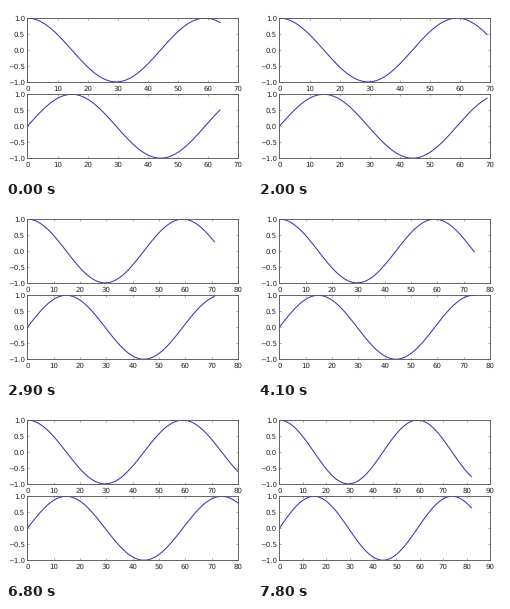
A matplotlib script that plays this animation: 246x173 px, repeating every 8000 ms.

```python
import numpy as np
import matplotlib.pyplot as plt
from matplotlib.animation import FuncAnimation

W, H, DPI = 246, 173, 100
PX = 72 / DPI  # points per pixel
LEFT, RIGHT = 21.4, 232.1
FIRST, PERIOD = 64, 59
INTERVAL, FRAMES = 100, 80
STEPS = [300, 700, 1200, 1600, 2000, 2500, 2900, 3300, 3700,
         4100, 4600, 5000, 5500, 5900, 6300, 6800, 7200, 7800]
GREY, INK, CURVE = "#585858", "#202020", "#4f2cba"

plt.rcParams.update({"font.family": "DejaVu Sans", "font.size": 7.3 * PX,
                     "text.hinting": "none", "text.hinting_factor": 1})
fig = plt.figure(figsize=(W / DPI, H / DPI), dpi=DPI, facecolor="white")


def make_axes(top, bottom):
    ax = fig.add_axes([LEFT / W, 1 - bottom / H,
                       (RIGHT - LEFT) / W, (bottom - top) / H])
    ax.set_ylim(-1, 1)
    ax.set_yticks(np.linspace(-1, 1, 5))
    ax.tick_params(direction="in", top=True, right=True, color=GREY,
                   labelcolor=INK, length=2.4 * PX, width=0.5 * PX)
    ax.tick_params(axis="x", pad=3.6 * PX)
    ax.tick_params(axis="y", pad=2.4 * PX)
    for spine in ax.spines.values():
        spine.set(linewidth=0.9 * PX, edgecolor=GREY)
    line, = ax.plot([], [], color=CURVE, lw=1.05 * PX)
    return ax, line


panels = [(*make_axes(12.1, 75.9), np.cos),
          (*make_axes(88.3, 152.2), np.sin)]


def update(i):
    last = FIRST + int(np.searchsorted(STEPS, i * INTERVAL, side="right"))
    limit = 10 * int(np.ceil(last / 10))
    x = np.arange(last + 1)
    for ax, line, wave in panels:
        line.set_data(x, wave(2 * np.pi * x / PERIOD))
        ax.set_xlim(0, limit)
        ax.set_xticks(range(0, limit + 1, 10))
    return [line for _, line, _ in panels]


anim = FuncAnimation(fig, update, frames=FRAMES, interval=INTERVAL,
                     repeat=True, repeat_delay=0, blit=False)
plt.show()
```
